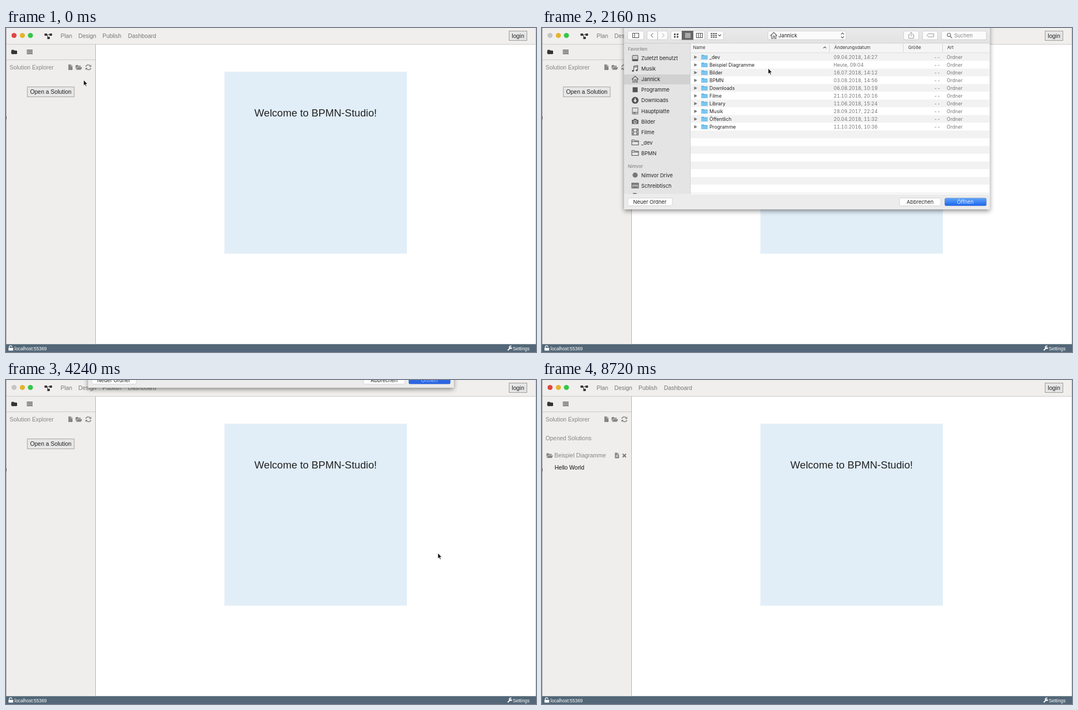
These frames come from a looping animation (956 px wide and 586 px high, 8800 ms). An HTML page:

```html
<!DOCTYPE html>
<html lang="de">
<head>
<meta charset="utf-8">
<title>BPMN-Studio</title>
<style>
html, body { margin: 0; height: 100%; overflow: hidden; background: #fff; }
svg { display: block; }
text { font: 10.4px "Liberation Sans", Arial, sans-serif; white-space: pre; }
#sheet text { font-family: Inter, sans-serif; font-variant-numeric: tabular-nums; }
</style>
</head>
<body>
<svg id="stage" width="956" height="586" viewBox="0 0 956 586"></svg>
<script>
const LOOP = 8800, STEP = 80;
const GREY = '#858585', DARK = '#333';

const rect = (x, y, w, h, fill, more = '') =>
  `<rect x="${x}" y="${y}" width="${w}" height="${h}" fill="${fill}" ${more}/>`;
const text = (x, y, str, fill = '#222', size = 10.4, more = '') =>
  `<text x="${x}" y="${y}" fill="${fill}" style="font-size:${size}px" ${more}>${str}</text>`;
const path = (d, fill = 'none', stroke = 'none', more = '') =>
  `<path d="${d}" fill="${fill}" stroke="${stroke}" ${more}/>`;
const circle = (x, y, r, fill, more = '') => `<circle cx="${x}" cy="${y}" r="${r}" fill="${fill}" ${more}/>`;
const at = (x, y, content, more = '') => `<g transform="translate(${x} ${y})" ${more}>${content}</g>`;
const group = (id, content, more = '') => `<g id="${id}" ${more}>${content}</g>`;

// Icons of the main window
const openFolder = (x, y) => at(x, y, path('M0 7V1.2Q0 0 1.2 0H4l1.2 1.2H8.5Q9.5 1.2 9.5 2.5V3.2H3.2ZM.5 8.5 3.3 4H12L9.6 8.5Z', 'currentColor'));
const file = (x, y) => at(x, y, path('M0 0H4.3V3.2H7.5V10H0ZM5 0 7.5 2.5H5Z', GREY));
const refresh = at(143, 66, path('M1 4.2A4.3 4.3 0 0 1 9 3M10 6A4.3 4.3 0 0 1 2 7.3', 'none', GREY, 'stroke-width="1.5"')
  + path('M10.7 .2V4.2H6.7ZM.3 10V6H4.3Z', GREY));

const mainWindow = () => {
  const nav = [[98.5, 'Plan'], [130.5, 'Design'], [174, 'Publish'], [220, 'Dashboard']];
  return rect(0, 0, 956, 586, '#fff')
    + rect(394, 79, 329, 329, '#e1eef8')
    + text(558.5, 160, 'Welcome to BPMN-Studio!', '#222', 18.6, 'text-anchor="middle"')
    + rect(0, 0, 956, 29, '#f0efed') + rect(0, 29, 161, 543, '#efeeec')
    + rect(0, 29, 956, 1, '#c9c9c7') + rect(0, 57, 161, 1, '#c9c9c7') + rect(161, 30, 1, 542, '#b4b4b2')
    + circle(14.5, 13.5, 4.6, '#df4744', 'id="close"') + circle(29.5, 13.5, 4.6, '#e6b32e') + circle(44, 13.5, 4.6, '#35c748')
    + path('M72 12H80M73 12 77 18', 'none', DARK, 'stroke-width="1.1"')
    + rect(69.5, 10, 4.5, 4, DARK) + rect(78.5, 10, 4.5, 4, DARK) + rect(74.5, 16, 4.5, 4, DARK)
    + nav.map(([x, s]) => text(x, 17.5, s, '#777')).join('')
    + rect(907.5, 5.5, 32, 17, '#e6e6e6', 'stroke="#999"') + text(912.3, 17.7, 'login', '#222', 10.7)
    + path('M9.5 41Q9.5 39.5 11 39.5H14L15.2 40.7H18.5Q20 40.7 20 42V46Q20 47.2 18.5 47.2H11Q9.5 47.2 9.5 46Z', DARK)
    + [39, 42, 45].map(y => rect(37.5, y, 10.5, 2.4, '#808080')).join('')
    + text(6.5, 75, 'Solution Explorer', GREY) + file(112.5, 66)
    + group('openIcon', openFolder(125.5, 67)) + refresh
    + rect(0, 572, 956, 14, '#536778') + rect(0, 571, 956, 1, '#d5d9dc')
    + rect(4.5, 578.5, 8.5, 5, '#fff') + path('M6 579V577A2.3 2.3 0 0 1 10.6 576.7', 'none', '#fff', 'stroke-width="1.3"')
    + text(15.3, 582.6, 'localhost:55369', '#fff', 8.3)
    + path('M905.5 582.5 910 578', 'none', '#fff', 'stroke-width="2" stroke-linecap="round"')
    + path('M911.5 575.5A2.3 2.3 0 1 0 912.5 578', 'none', '#fff', 'stroke-width="1.6"')
    + text(914.3, 582.6, 'Settings', '#fff', 8.3)
    + rect(0, 0, 1, 572, '#aaa') + rect(955, 0, 1, 572, '#ccc') + rect(0, 160, 1, 5, '#444');
};

const emptyExplorer = () => rect(38.5, 106.5, 84.5, 18, '#e6e6e6', 'stroke="#a5a5a5"') + text(43.5, 119, 'Open a Solution');

const solution = () => text(6.5, 108.7, 'Opened Solutions', GREY)
  + at(0, 0, openFolder(8, 132.5), `color="${GREY}"`) + text(22.3, 140.3, 'Beispiel Diagramme', GREY)
  + file(131.5, 131.5) + path('M133 137.5H137.5M135.2 135.2V139.8', 'none', '#eee')
  + path('M145.5 133.7 151.5 139.7M151.5 133.7 145.5 139.7', 'none', '#777', 'stroke-width="2"');

// Icons of the file dialog, centred on 0,0
const line = d => path(d, 'none', '#555', 'stroke-width="1.1"');
const box = line('M-6-4.5H-1.5L-.5-3H6V4.5H-6ZM-6-1.5H6');
const house = line('M-6 .5 0-5.5 6 .5M-4-1V5.5H-1V1H1.5V5.5H4V-1');
const disk = rect(-5, -5.5, 10, 11, '#ddd', 'stroke="#666"') + line('M-5 2.5H5M-3 4H1');
const icons = {
  recent: rect(-5, -5, 10, 10, '#ccc', 'stroke="#555" rx="1"') + rect(-5, 2, 10, 3, '#555'),
  music: line('M-2.5 4V-4.5L4.5-5.5V2.5M-2.5-2.5 4.5-3.5') + circle(-4, 4, 1.8, '#555') + circle(3, 3, 1.8, '#555'),
  house, disk, box,
  plain: rect(-4.5, -4.5, 9, 9, '#555'),
  down: circle(0, 0, 6.2, '#555') + path('M-1-3.5H1V0H3.2L0 3.7-3.2 0H-1Z', '#eee'),
  camera: path('M-6-3H-3L-2-4.8H2L3-3H6V4.5H-6Z', '#666') + circle(0, .7, 2.7, '#ddd') + circle(0, .7, 1.6, '#666'),
  film: line('M-5.5-5.5H5.5V5.5H-5.5ZM-3-5.5V5.5M3-5.5V5.5M-3 0H3M-5.5-2.5H-3M-5.5 2.5H-3M3-2.5H5.5M3 2.5H5.5'),
  disc: circle(0, 0, 4.6, '#777'),
  desk: rect(-6, -4.5, 12, 9, '#aaa', 'stroke="#555"') + line('M-6-2.5H6M-4 2.5H4'),
};
const folder = (x, y) => at(x, y, path('M0 0H4L5 1H11V8.5H0Z', '#58b1e4') + rect(0, 2.3, 11, 6.2, '#7cc6f0'));

const places = [
  [54.5, 'recent', 'Zuletzt benutzt'], [73.5, 'music', 'Musik'], [92.5, 'house', 'Jannick'],
  [111.7, 'plain', 'Programme'], [130.8, 'down', 'Downloads'], [150, 'disk', 'Hauptplatte'],
  [169, 'camera', 'Bilder'], [188, 'film', 'Filme'], [207, 'box', '_dev'], [226, 'box', 'BPMN'],
  [266, 'disc', 'Nimvor Drive'], [285, 'desk', 'Schreibtisch'],
];
const files = [
  ['_dev', '09.04.2018, 14:27'], ['Beispiel Diagramme', 'Heute, 09:04'], ['Bilder', '16.07.2018, 14:12'],
  ['BPMN', '03.08.2018, 14:56'], ['Downloads', '06.08.2018, 10:19'], ['Filme', '21.10.2016, 20:16'],
  ['Library', '11.06.2018, 15:24'], ['Musik', '28.09.2017, 22:24'], ['Öffentlich', '20.04.2018, 11:32'],
  ['Programme', '11.10.2016, 10:36'],
];
const button = (x, y, w, h, fill = '#fff', more = '') => rect(x, y, w, h, fill, `rx="2.5" stroke="#000" stroke-opacity=".13" ${more}`);

const toolbar = () => [[154, 30], [189, 38], [232, 62], [298, 30], [407, 142], [652, 28], [686, 28], [720, 82]]
    .map(([x, w]) => button(x + .5, 5.5, w - 1, 15.5, '#fbfbfb')).join('')
  + line('M163.5 9.5H174.5V17.5H163.5ZM167 9.5V17.5') + rect(252, 5, 21, 16.5, '#666')
  + path('M200.5 9.5 196.5 13.3 200.5 17', 'none', 'currentColor', 'id="back" stroke-width="1.3"')
  + path('M216.5 9.5 220.5 13.3 216.5 17M208.5 6V21', 'none', '#aaa')
  + [238, 243].map(x => [10, 14.5].map(y => rect(x, y, 3, 3, '#555')).join('')).join('')
  + path('M258 10H268M258 12.3H268M258 14.6H268M258 17H268', 'none', '#fff')
  + line('M278.5 9.5H289.5V17.5H278.5ZM282.2 9.5V17.5M285.8 9.5V17.5')
  + [304.5, 308.5, 312.5].map(x => [9, 12.3, 15.6].map(y => rect(x, y, 2.8, 2, '#555')).join('')).join('')
  + line('M318 12 320.5 14.5 323 12M539.5 11.5 542 9 544.5 11.5M539.5 15.5 542 18 544.5 15.5')
  + path('M664 12H661.5V18.5H670.5V12H668M666 15V8M663.5 10.2 666 7.7 668.5 10.2', 'none', '#999')
  + path('M697 10.5H706.5V16H697L694 13.3Z', 'none', '#999')
  + circle(734, 12.5, 3, 'none', 'stroke="#666" stroke-width="1.1"') + line('M736.2 14.8 739.5 18')
  + text(743.5, 16.8, 'Suchen', '#8a8a8a', 9.3);

const fileRow = ([name, date], i) => {
  const y = 52.7 + 14 * i;
  return path(`M274.5 ${y - 3}V${y + 3}L280 ${y}Z`, '#777') + folder(287.5, y - 4.3)
    + text(302, y + 3.2, name, '#222', 8.7) + text(526, y + 3.2, date, '#777', 8.7)
    + text(707, y + 3.2, '--', '#777', 8.7) + text(730, y + 3.2, 'Ordner', '#777', 8.7);
};

const sheet = () => {
  const title = (id, icon, name) => group(id, icon + text(426.5, 16.8, name, '#222', 9.2));
  const stripes = Array.from({ length: 19 }, (_, i) => rect(268, 45.5 + 14 * i, 539, 14, i % 2 ? '#fff' : '#f2f2f2')).join('');
  const columns = [[272.5, 'Name'], [527, 'Änderungsdatum'], [660.5, 'Größe'], [731, 'Art']];
  return rect(148, -10, 659.5, 338, '#ebeaeb', 'filter="url(#shadow)"')
    + rect(148, -10, 659.5, 338, 'url(#bar)') + rect(148, 27, 120, 273, '#e5e4e5')
    + toolbar()
    + title('homeTitle', at(418, 13.5, house, 'color="#555"'), 'Jannick')
    + title('folderTitle', folder(412.5, 9.5), 'Beispiel Diagramme')
    + rect(268, 27, 539, 274, '#fff') + rect(268, 27, 539, 17.5, '#f5f5f5')
    + `<g clip-path="url(#list)">${stripes}</g>` + rect(148, 27, 659, .8, '#c8c8c8') + rect(268, 44.5, 539, .8, '#d0d0d0')
    + rect(267, 27, 1, 273, '#d0d0d0') + [518, 651, 722].map(x => rect(x, 29, 1, 14, '#d5d5d5')).join('')
    + columns.map(([x, s]) => text(x, 38.2, s, '#333', 8, 'font-weight="500"')).join('') + line('M507.5 36.5 510 34 512.5 36.5')
    + rect(148, 84, 119, 18, '#d2d1d2', 'id="homeMark"')
    + text(155, 41, 'Favoriten', '#777', 8) + text(155, 252.5, 'Nimvor', '#777', 8)
    + places.map(([y, icon, name]) => at(168, y, icons[icon]) + text(179, y + 3.5, name, '#222', 9.3)).join('')
    + path('M164 300V298.5H169L172 300Z', '#666')
    + group('files', files.map(fileRow).join(''))
    + button(155, 307.5, 80, 14) + button(645, 307.5, 74.5, 14) + button(726.5, 307.5, 75, 14, '#fff', 'id="openButton"')
    + [[194.5, 'Neuer Ordner', ''], [682, 'Abbrechen', ''], [763.5, 'Öffnen', 'id="openLabel"']]
      .map(([x, s, id]) => text(x, 317.8, s, '#222', 9.3, `text-anchor="middle" ${id}`)).join('');
};

const cursor = () => group('arrow', path('M0 0V10.2L2.3 8.1 3.9 11.6 5.5 10.9 4 7.5H7Z', '#111', '#fff', 'stroke-width=".7"'))
  + group('hand', path('M-1 0Q.2-1 1 .3L1.6 4 3 3.7 4.2 4.2 5.6 4.4 6.8 5.3V8.5L5.5 11.8H-.2L-3.2 7.6Q-3.4 6.3-2 6.5L-.5 8Z', '#fff', '#111'));

const stage = document.getElementById('stage');
stage.innerHTML = `<defs>
  <filter id="shadow" x="-10%" y="-10%" width="120%" height="125%"><feDropShadow dx="0" dy="3" stdDeviation="4" flood-opacity=".45"/></filter>
  <linearGradient id="bar" x2="0" y2="1"><stop stop-color="#efeeef"/><stop offset=".1" stop-color="#e4e3e4"/><stop offset=".2" stop-color="#ececec"/></linearGradient>
  <linearGradient id="blue" x2="0" y2="1"><stop stop-color="#63a5f8"/><stop offset="1" stop-color="#1c66ee"/></linearGradient>
  <clipPath id="list"><rect x="268" y="45" width="539" height="255"/></clipPath></defs>`
  + mainWindow() + group('empty', emptyExplorer()) + group('solution', solution())
  + group('input', rect(23.5, 151.5, 110, 18.5, '#fff', 'stroke="#c4c4c4"') + text(25, 164.5, '', '#111', 10.4, 'id="typed"'))
  + group('diagram', text(22.7, 162.3, 'Hello World', '#111'))
  + group('sheet', sheet()) + group('cursor', cursor());

const el = id => document.getElementById(id);
const show = (id, on) => el(id).style.display = on ? '' : 'none';
const ease = (t, from, to) => {
  const p = Math.min(1, Math.max(0, (t - from) / (to - from)));
  return p * p * (3 - 2 * p);
};

// Pointer stops: time, x, y
const stops = [[0, 140, 94], [400, 140, 94], [880, 135, 74], [1680, 135, 74], [2080, 408, 73], [2160, 408, 73], [2400, 372, 67],
  [2800, 372, 67], [3600, 779, 313], [4320, 779, 313], [5200, 161, 182], [5440, 161, 182], [5920, 135, 135], [LOOP, 135, 135]];
const pointer = t => {
  const i = stops.findIndex(s => s[0] > t), [t0, x0, y0] = stops[i - 1], [t1, x1, y1] = stops[i];
  const p = ease(t, t0, t1);
  return [x0 + (x1 - x0) * p, y0 + (y1 - y0) * p];
};

function draw(t) {
  const opened = t >= 2640, done = t >= 4400, pressed = t >= 3760, key = t >= 1680;
  const lift = 335 * (1 - ease(t, 1360, 1670) + ease(t, 3977, 4287));
  show('sheet', t >= 1360 && t < 4290);
  el('sheet').setAttribute('transform', `translate(0 ${-lift})`);
  el('close').setAttribute('fill', t >= 1200 && t < 4290 ? '#c5c5c5' : '#df4744');
  ['files', 'homeTitle', 'homeMark'].forEach(id => show(id, !opened));
  show('folderTitle', opened);
  el('back').setAttribute('stroke', opened ? '#222' : '#999');
  el('openButton').setAttribute('fill', pressed ? '#2b66e3' : key ? 'url(#blue)' : '#fff');
  el('openLabel').setAttribute('fill', pressed ? '#a9cbff' : key ? '#e3efff' : '#222');

  const hoverOpen = t >= 720 && t < 1680, hoverAdd = t >= 5840;
  el('openIcon').setAttribute('color', hoverOpen ? '#222' : GREY);
  show('empty', !done);
  show('solution', done);
  show('input', t >= 6240 && t < 8400);
  show('diagram', t >= 8400);
  el('typed').textContent = 'Hello World'.slice(0, Math.max(0, Math.floor((t - 6880) / 105))) + '|';

  const [x, y] = pointer(t);
  el('cursor').setAttribute('transform', `translate(${x} ${y})`);
  show('cursor', t < 6960);
  show('hand', hoverOpen || hoverAdd);
  show('arrow', !hoverOpen && !hoverAdd);
}

function frame() {
  draw(Math.floor(performance.now() % LOOP / STEP) * STEP);
  requestAnimationFrame(frame);
}
frame();
</script>
</body>
</html>
```
